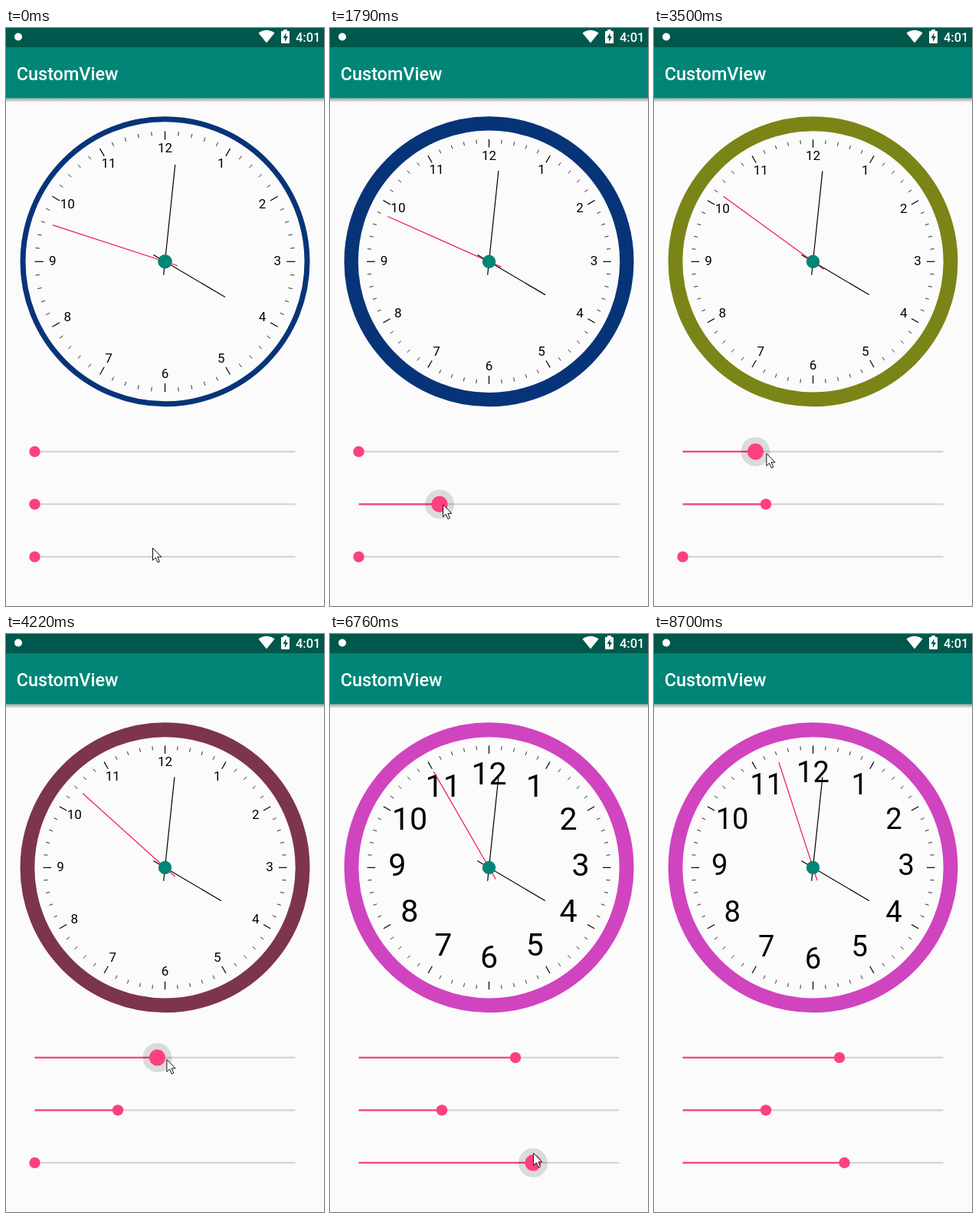
Recreate the animation shown at these times as an HTML page. Size 415 by 753 pixels, loop 8850 ms.

```html
<!DOCTYPE html>
<html lang="en">
<head>
<meta charset="utf-8">
<title>CustomView</title>
<style>
html, body { margin: 0; width: 100%; height: 100%; overflow: hidden; background: #fbfbfb; }
svg { display: block; width: 100%; height: 100%; }
text { font-family: Roboto, "Noto Sans", sans-serif; }
</style>
</head>
<body>
<svg viewBox="0 0 415 753">
  <defs>
    <linearGradient id="shade" x1="0" y1="0" x2="0" y2="1">
      <stop offset="0" stop-color="#000" stop-opacity=".36"/>
      <stop offset="1" stop-color="#000" stop-opacity="0"/>
    </linearGradient>
  </defs>
  <rect width="415" height="753" fill="#fbfbfb"/>
  <rect y="91.5" width="415" height="5.5" fill="url(#shade)"/>
  <rect width="415" height="91.5" fill="#008577"/>
  <rect width="415" height="25" fill="#00574b"/>
  <g fill="#fff">
    <circle cx="16" cy="11.5" r="5"/>
    <path d="M329.5 6.5Q340 -1 350.5 6.5L340 19.5Z"/>
    <path d="M362 4V2h5v2h2q1 0 1 1v14q0 1-1 1h-9q-1 0-1-1V5q0-1 1-1Z"/>
    <text x="410.5" y="18" font-size="16.5" font-weight="500" text-anchor="end">4:01</text>
    <text x="13.8" y="68" font-size="23.4" font-weight="500">CustomView</text>
  </g>
  <path d="M365.5 6.5L361.5 13H364V18L368 11H365.5Z" fill="#00574b"/>
  <g id="clock"></g>
  <g id="sliders"></g>
  <path id="cursor" d="M.5 .5V16.5L4.2 13L6.9 19.2L9.4 18.1L6.8 12H11.8Z"
    fill="#fff" stroke="#111" stroke-linejoin="round"/>
</svg>
<script>
const LOOP = 8850, STEP = 130;
const CX = 207.5, CY = 304.3, OUTER = 189;
const LEFT = 37.5, RIGHT = 377.5;
const PINK = "#fc4082";

// The picture moves in steps of about STEP ms, with pauses between these spans.
const activeSpans = [[430, 970], [1250, 5300], [5580, 6480], [6760, 7060], [7340, 8270], [8700, 8700]];

// path: thumb x over time; grip: pointer offset from the thumb at press and at release
const drags = {
  width: { y: 620.4, down: 1200, up: 2210, grip: [[4, 0], [4, 0]],
    path: [[1235, LEFT], [1510, 104], [1772, 143], [1903, 146]] },
  color: { y: 551.9, down: 2600, up: 4610, grip: [[16, 2], [11, 2]],
    path: [[2600, LEFT], [3471, 132.5], [4255, 197.5], [4640, 242]] },
  size: { y: 688.9, down: 5560, up: 7340, grip: [[19, -3], [-9, -18]],
    path: [[5500, LEFT], [5580, 82], [6480, 268], [6760, 265], [7060, 248.5]] }
};
const pointerStart = { t: 300, point: [191, 677] };
const pointerExit = { t: 8270, point: [358, 770] };

// Ring colour by slider level
const ringStops = [[0, [7, 52, 120]], [.28, [123, 132, 22]], [.47, [125, 52, 77]], [.6, [208, 68, 192]]];

const clamp = v => Math.max(0, Math.min(1, v));
const mix = (a, b, u) => Array.isArray(a) ? a.map((v, i) => mix(v, b[i], u)) : a + (b - a) * u;

function along(keys, at) {
  const next = keys.findIndex(key => key[0] >= at);
  if (next === 0) return keys[0][1];
  if (next < 0) return keys[keys.length - 1][1];
  const [from, a] = keys[next - 1], [to, b] = keys[next];
  return mix(a, b, (at - from) / (to - from));
}

function stepTime(t) {
  const span = activeSpans.filter(([from]) => t >= from).pop();
  if (!span) return 0;
  const [from, to] = span;
  const count = Math.max(1, Math.round((to - from) / STEP));
  const gap = (to - from) / count;
  return gap ? Math.min(to, from + Math.floor((t - from + 40) / gap) * gap) : from;
}

function set(node, attrs) {
  for (const key in attrs) node.setAttribute(key, attrs[key]);
}

function add(parent, tag, attrs) {
  const node = document.createElementNS("http://www.w3.org/2000/svg", tag);
  set(node, attrs);
  return parent.appendChild(node);
}

function polar(radius, degrees) {
  const a = degrees * Math.PI / 180;
  return [CX + radius * Math.sin(a), CY - radius * Math.cos(a)];
}

function setLine(node, from, to, degrees) {
  const [x1, y1] = polar(from, degrees), [x2, y2] = polar(to, degrees);
  set(node, { x1, y1, x2, y2 });
}

const clock = document.getElementById("clock");
const cursor = document.getElementById("cursor");
const ring = add(clock, "circle", { cx: CX, cy: CY, fill: "none" });
const ticks = Array.from({ length: 60 }, (_, i) =>
  add(clock, "line", { stroke: "#000", "stroke-width": i % 5 ? .8 : 1.2 }));
const numerals = Array.from({ length: 12 }, (_, i) => {
  const node = add(clock, "text", { "text-anchor": "middle" });
  node.textContent = i + 1;
  return node;
});
const [hourHand, minuteHand, secondHand] = ["#000", "#000", "#f0184c"].map(stroke =>
  add(clock, "line", { stroke, "stroke-width": 1.2 }));
const hub = add(clock, "circle", { cx: CX, cy: CY, fill: "#008577" });

function makeSlider(y) {
  const group = add(document.getElementById("sliders"), "g", {});
  const bar = stroke =>
    add(group, "line", { x1: LEFT, x2: RIGHT, y1: y, y2: y, stroke, "stroke-width": 2.3 });
  const dot = fill => add(group, "circle", { cy: y, r: 19, fill });
  bar("#d5d5d5");
  return { fill: bar(PINK), ripple: dot("#000"), thumb: dot(PINK) };
}

for (const drag of Object.values(drags)) drag.parts = makeSlider(drag.y);

function drawSlider({ path, down, up, parts }, t) {
  const x = along(path, t);
  const press = clamp((t - down) / 140) * clamp(1 - (t - up) / 250);
  set(parts.fill, { x2: x });
  set(parts.ripple, { cx: x, "fill-opacity": .13 * press });
  set(parts.thumb, { cx: x, r: 7.2 + 3.4 * press });
  return (x - LEFT) / (RIGHT - LEFT);
}

function gripPoint({ y, path, grip, down, up }, t) {
  const [dx, dy] = mix(...grip, (t - down) / (up - down));
  return [along(path, t) + dx, y + dy];
}

// The pointer holds each thumb while pressed and glides straight to the next one.
function pointerAt(t) {
  let last = pointerStart;
  const glide = (to, point) => mix(last.point, point, clamp((t - last.t) / (to - last.t)));
  for (const drag of Object.values(drags)) {
    if (t < drag.down) return glide(drag.down, gripPoint(drag, drag.down));
    if (t <= drag.up) return gripPoint(drag, t);
    last = { t: drag.up, point: gripPoint(drag, drag.up) };
  }
  return glide(pointerExit.t, pointerExit.point);
}

function drawClock({ width, color, size }, seconds) {
  const band = width > 0 ? 59 * width : 7;
  const fontSize = size > 0 ? 61.5 * size : 17;
  const inner = OUTER - band;
  const tickEnd = inner * .934, tickStart = inner * .872;
  const stroke = `rgb(${along(ringStops, color).map(Math.round)})`;
  set(ring, { r: OUTER - band / 2, "stroke-width": band, stroke });
  ticks.forEach((node, i) => setLine(node, i % 5 ? inner * .904 : tickStart, tickEnd, i * 6));
  numerals.forEach((node, i) => {
    const [x, y] = polar(tickStart - fontSize * .7, (i + 1) * 30);
    set(node, { x, y: y + fontSize * .265, "font-size": fontSize });
  });
  setLine(hourHand, -17.5, inner * .5, 120.5);
  setLine(minuteHand, -17.5, inner * .697, 6);
  setLine(secondHand, -17.5, inner * .848, seconds * 6);
  set(hub, { r: inner * .051 });
}

function render(time) {
  const t = stepTime(time % LOOP);
  const levels = {};
  for (const name in drags) levels[name] = drawSlider(drags[name], t);
  drawClock(levels, 48 + Math.floor((t + 140) / 980));
  set(cursor, { transform: `translate(${pointerAt(t)})` });
}

const start = performance.now();
function frame() {
  render(performance.now() - start);
  requestAnimationFrame(frame);
}
frame();
</script>
</body>
</html>
```
